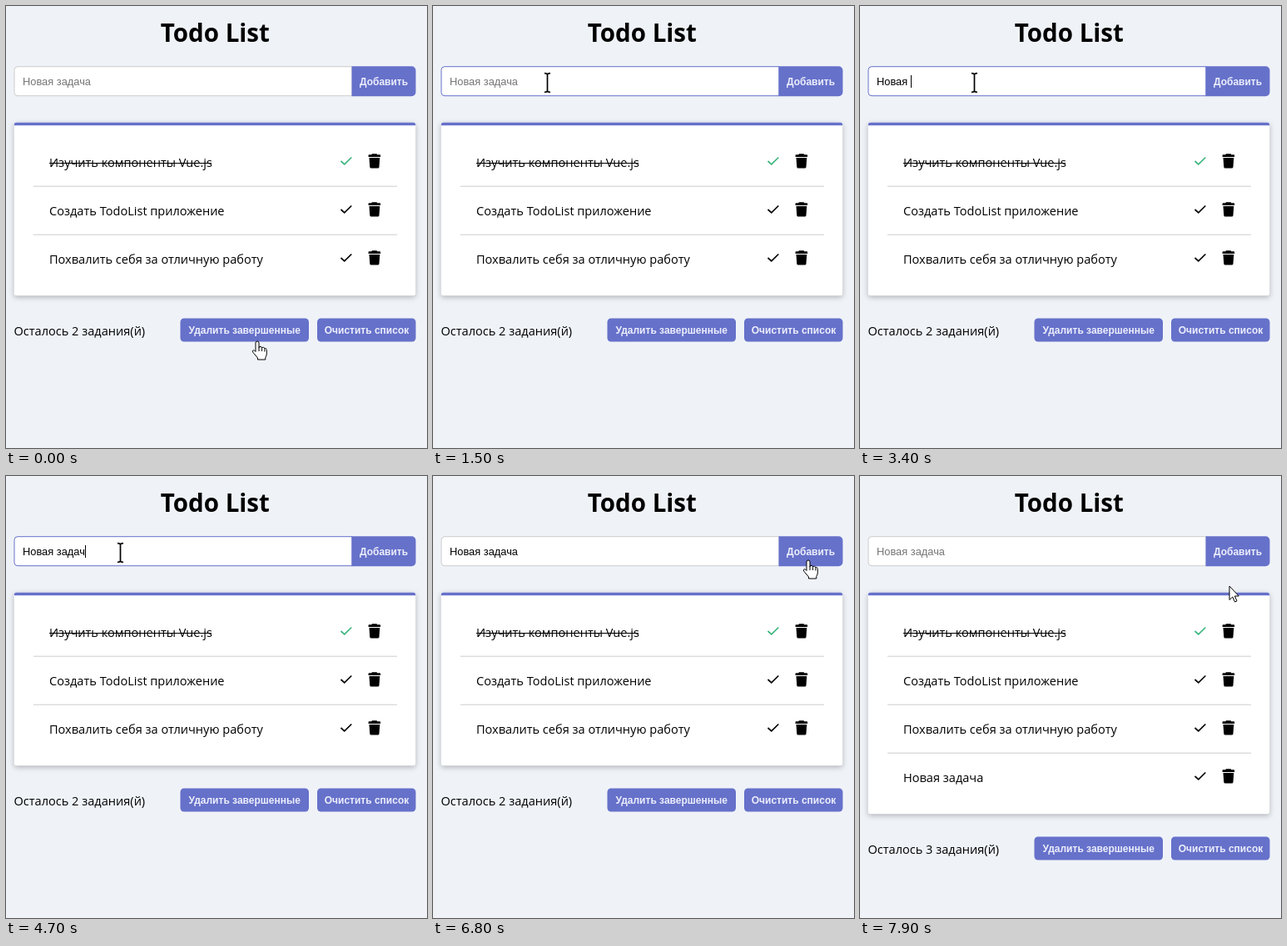
Write an HTML page that moves like this. It is 506x530 px and loops after 8000 ms.

```html
<!DOCTYPE html>
<html lang="ru">
<head>
<meta charset="utf-8">
<title>Todo List</title>
<style>
html, body { margin: 0; width: 100%; height: 100%; overflow: hidden; background: #eff3f8; }
svg { display: block; }
text { font: 14.57px "Open Sans", "Noto Sans", sans-serif; white-space: pre; }
.title { font-size: 29.5px; font-weight: 700; text-anchor: middle; }
.field { font: 12.85px "Liberation Sans", Arial, sans-serif; }
.label { font: bold 12px "Liberation Sans", Arial, sans-serif; fill: #eceefb; text-anchor: middle; }
.accent { fill: #6671ca; }
.card { filter: drop-shadow(0 2px 3px #0004); }
</style>
</head>
<body>
<svg width="506" height="530" viewBox="0 0 506 530">
  <defs>
    <clipPath id="cardClip"><rect id="clip" x="9.5" y="139.5" width="483" height="208" rx="4"/></clipPath>
  </defs>
  <text class="title" x="251.300" y="43">Todo List</text>

  <path id="box" d="M416 72.700H14a4 4 0 0 0-4 4v27a4 4 0 0 0 4 4H416z" fill="#fff"/>
  <path class="accent" d="M415.500 72.300h72a5 5 0 0 1 5 5v26a5 5 0 0 1-5 5h-72z"/>
  <text class="label" x="454" y="94.500">Добавить</text>
  <text class="field" id="entry" x="20" y="94.500"></text>
  <rect id="caret" y="83" width="1" height="15"/>

  <g class="card"><g clip-path="url(#cardClip)">
    <rect id="card" x="9.500" y="139.500" width="483" height="208" fill="#fff"/>
    <rect class="accent" x="9.500" y="139.500" width="483" height="3.700"/>
  </g></g>
  <g id="rows"></g>

  <g id="footer">
    <text id="left" x="9.500" y="394.500"></text>
    <rect class="accent" x="209.500" y="374.500" width="154.500" height="28" rx="4.500"/>
    <text class="label" x="286.700" y="392.500">Удалить завершенные</text>
    <rect class="accent" x="374" y="374.500" width="118.500" height="28" rx="4.500"/>
    <text class="label" x="433.500" y="392.500">Очистить список</text>
  </g>

  <g id="pointer" fill="#fff" stroke="#000" stroke-linejoin="round">
    <path id="arrow" d="M0 0V16.500L3.800 13 6.500 19 9 17.900 6.400 12H11.300z"/>
    <path id="hand" d="M-2 2a2 2 0 0 1 4 0V8q0-2 2-1.600 1.600.2 1.600 2 .2-1.400 1.900-1.100 1.400.3 1.400 2 .3-1 1.400-.6 1 .4 1 2V15q0 2-1.500 4.500V22H.5V20L-5 13.500q-1.400-2 .2-2.800 1.100-.4 2.800 1.800zM2 8v4M5.600 8.500V12M8.900 9.500V12.500"/>
    <g id="beam" fill="none">
      <path d="M-3.500-11.300Q0-11.300 0-9.500 0-11.300 3.500-11.300M0-10V10M-3.500 11.300Q0 11.300 0 9.500 0 11.300 3.500 11.300" stroke="#fff" stroke-width="3.500"/>
      <path d="M-3.500-11.300Q0-11.300 0-9.500 0-11.300 3.500-11.300M0-10V10M-3.500 11.300Q0 11.300 0 9.500 0 11.300 3.500 11.300" stroke-width="1.700"/>
    </g>
  </g>
</svg>
<script>
const LOOP = 8000, STEP = 100, ROW = 58;
const FOCUS = 900, BLUR = 6800, ADD = 6900;
const phrase = 'Новая задача';
const keys = [1900, 2200, 2900, 3100, 3300, 3400, 3700, 4000, 4300, 4400, 4700, 4800];
const tasks = ['Изучить компоненты Vue.js', 'Создать TodoList приложение',
  'Похвалить себя за отличную работу', phrase];
// time, x, y of the pointer's hot spot
const route = [[0, 302, 402], [300, 268, 330], [700, 160, 135], [900, 139, 95], [1000, 137.5, 92],
  [5200, 137.5, 92], [5700, 291.7, 79], [6100, 436, 88], [6400, 451, 101],
  [7700, 451, 101], [7900, 444, 132], [8000, 444, 132]];

const $ = id => document.getElementById(id);
const show = (id, on) => $(id).setAttribute('visibility', on ? 'visible' : 'hidden');

$('rows').innerHTML = tasks.map((task, i) => `<g id="row${i}" transform="translate(0 ${i * ROW})">
  ${i ? '<path d="M33 158.200H470" stroke="#ccc"/>' : ''}
  <text x="52" y="193.300">${task}</text>
  ${i ? '' : '<path d="M52 188.500H247" stroke="#000"/>'}
  <path d="M402.500 186 406.800 189.900 415.300 181.500" fill="none" stroke="${i ? '#000' : '#3db57f'}" stroke-width="1.700"/>
  <path d="M440 177.300h5.500l.8 1h3q.8 0 .8.800v1.900h-14.500v-1.900q0-.8.800-.8h2.800zM436.500 182h12.800l-.8 11.100q-.1 1.500-1.600 1.500h-8q-1.500 0-1.600-1.500z"/>
</g>`).join('');

function pointerAt(t) {
  const i = route.findIndex(p => p[0] > t);
  const [t0, x0, y0] = route[i - 1], [t1, x1, y1] = route[i];
  const k = (t - t0) / (t1 - t0);
  return [x0 + (x1 - x0) * k, y0 + (y1 - y0) * k];
}

function pointerKind(x, y) {
  const inside = (l, t, r, b) => x >= l && x <= r && y >= t && y <= b;
  if (inside(10, 72, 415, 108)) return 'beam';
  return inside(416, 72, 493, 108) || inside(209, 374, 364, 403) ? 'hand' : 'arrow';
}

function draw(t) {
  const added = t >= ADD, focused = t >= FOCUS && t < BLUR;
  const typed = added ? 0 : keys.filter(k => k <= t).length;
  const entry = $('entry');
  entry.textContent = typed ? phrase.slice(0, typed) : phrase;
  entry.setAttribute('fill', typed ? '#000' : '#757575');
  $('box').setAttribute('stroke', focused ? '#6671ca' : '#ccc');

  const since = t - (typed ? keys[typed - 1] : FOCUS + STEP);
  show('caret', focused && since >= 0 && since % 1000 < 500);
  $('caret').setAttribute('x', 20 + (typed ? Math.round(entry.getComputedTextLength()) : 0));

  const extra = added ? ROW : 0;
  for (const id of ['card', 'clip']) $(id).setAttribute('height', 208 + extra);
  show('row3', added);
  $('footer').setAttribute('transform', `translate(0 ${extra})`);
  $('left').textContent = `Осталось ${added ? 3 : 2} задания(й)`;

  const [x, y] = pointerAt(t), kind = pointerKind(x, y);
  $('pointer').setAttribute('transform', `translate(${x} ${y})`);
  for (const id of ['arrow', 'hand', 'beam']) show(id, id === kind);
}

const start = performance.now();
function tick() {
  const t = (performance.now() - start) % LOOP;
  draw(Math.floor(t / STEP) * STEP);
  requestAnimationFrame(tick);
}
tick();
</script>
</body>
</html>
```
